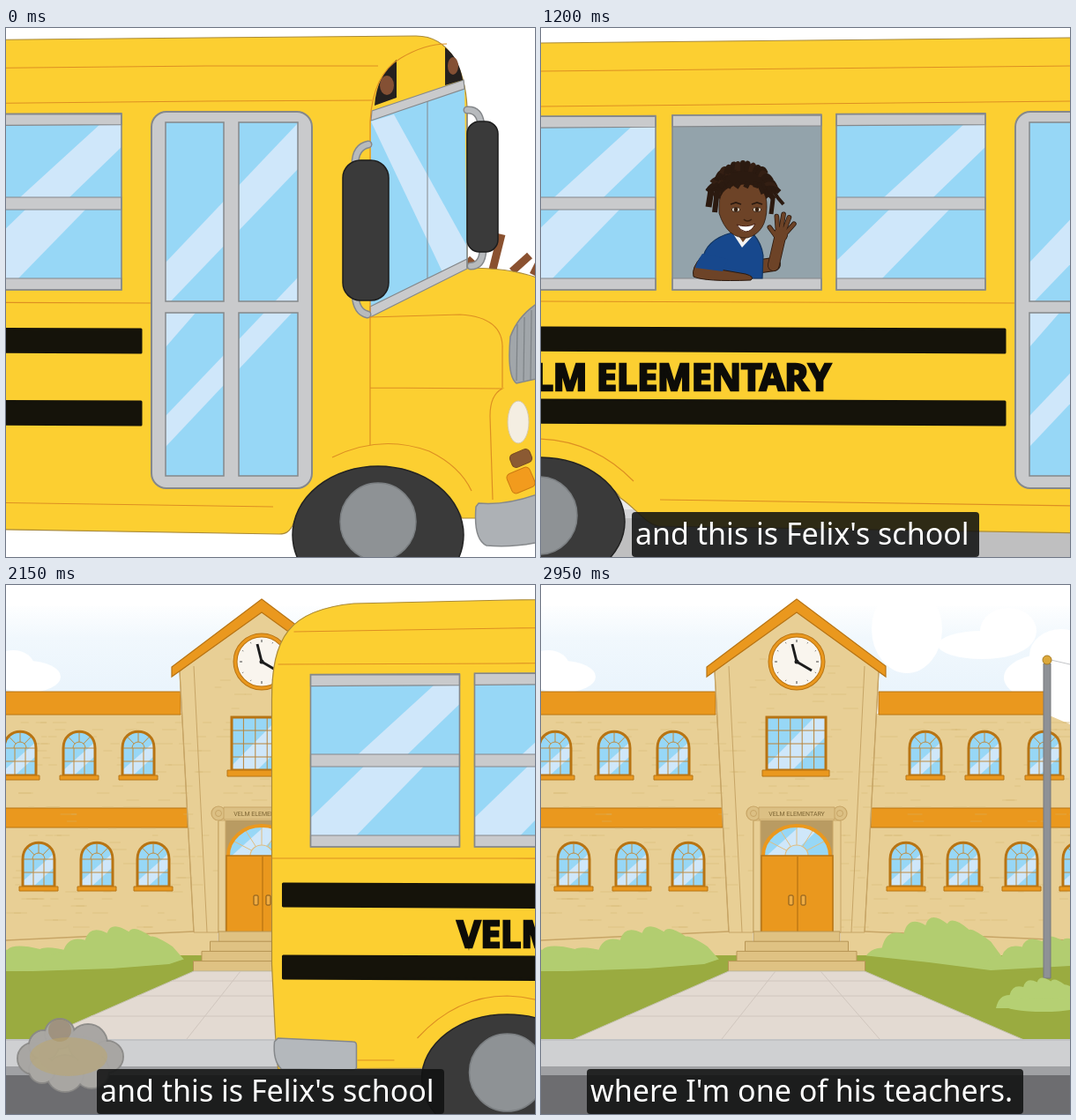
An HTML page with a canvas that plays this animation: 600x600 px, repeating every 3 s.

```html
<!DOCTYPE html>
<html lang="en">
<head>
<meta charset="utf-8">
<title>School bus</title>
<style>
html, body { margin: 0; width: 100%; height: 100%; overflow: hidden; background: #fff; }
canvas { display: block; width: 600px; height: 600px; }
</style>
</head>
<body>
<canvas id="stage" width="600" height="600"></canvas>
<script>
const LOOP = 3000, STEP = 50;
const YELLOW = '#fccf31', LINE = '#dd8f22', EDGE = '#85888b', BAR = '#c9cacc';
const GLASS = '#97d7f6', GLARE = '#cfe7fa', ORANGE = '#ea981e', RUST = '#b87413';
const WALL = '#e8cf95', STONE = '#c7a566', DARK = '#3a3a3a', SKIN = '#6d4327';
const stage = document.getElementById('stage').getContext('2d');
let c = stage;

function paint(fill, stroke, width = 1.5) {
  if (fill) { c.fillStyle = fill; c.fill(); }
  if (stroke) { c.strokeStyle = stroke; c.lineWidth = width; c.stroke(); }
}
function poly(pts, fill, stroke, width) {
  c.beginPath();
  for (let i = 0; i < pts.length; i += 2) c.lineTo(pts[i], pts[i + 1]);
  c.closePath();
  paint(fill, stroke, width);
}
function line(pts, color, width = 1) {
  c.beginPath();
  for (let i = 0; i < pts.length; i += 2) c.lineTo(pts[i], pts[i + 1]);
  paint(null, color, width);
}
function box(x, y, x2, y2, fill, stroke, width, r = 0) {
  c.beginPath();
  c.roundRect(x, y, x2 - x, y2 - y, r);
  paint(fill, stroke, width);
}
function oval(x, y, rx, ry, fill, stroke, width) {
  c.beginPath();
  c.ellipse(x, y, rx, ry, 0, 0, Math.PI * 2);
  paint(fill, stroke, width);
}
function shape(d, fill, stroke, width = 1.5) {
  const p = new Path2D(d);
  if (fill) { c.fillStyle = fill; c.fill(p); }
  if (stroke) { c.strokeStyle = stroke; c.lineWidth = width; c.stroke(p); }
}
function clipped(path, draw) {
  c.save();
  c.beginPath();
  path();
  c.clip();
  draw();
  c.restore();
}
function at(x, y, draw) {
  c.save();
  c.translate(x, y);
  draw();
  c.restore();
}
function random(seed) {
  return () => (seed = (seed * 16807) % 2147483647) / 2147483647;
}

// ---------- school ----------
function bricks() {
  const rnd = random(41);
  c.globalAlpha = 0.45;
  for (let i = 0; i < 420; i++) {
    const x = rnd() * 600, y = 60 + Math.floor(rnd() * 42) * 8, w = 6 + rnd() * 14;
    if (y < 150 && (x < 205 || x > 360)) continue;
    if (y < 112 && Math.abs(x + w / 2 - 290) > y - 42) continue;
    line([x, y, x + w, y], '#d3b36d');
  }
  c.globalAlpha = 1;
}
function archWindow(x, y) {
  const bars = '#c08a3c';
  const outline = () => {
    c.moveTo(x - 18, y + 50);
    c.lineTo(x - 18, y + 19);
    c.bezierCurveTo(x - 18, y - 6, x + 18, y - 6, x + 18, y + 19);
    c.lineTo(x + 18, y + 50);
    c.closePath();
  };
  clipped(outline, () => {
    box(x - 20, y - 2, x + 20, y + 52, GLASS);
    poly([x - 18, y + 44, x + 18, y + 12, x + 18, y + 28, x - 6, y + 50, x - 18, y + 50], GLARE);
    for (const k of [-6, 6]) line([x + k, y + 19, x + k, y + 50], bars);
    for (const k of [19, 34]) line([x - 18, y + k, x + 18, y + k], bars);
    for (const a of [0.8, 1.57, 2.34])
      line([x + 7 * Math.cos(a), y + 19 - 7 * Math.sin(a), x + 22 * Math.cos(a), y + 19 - 22 * Math.sin(a)], bars);
    c.beginPath();
    c.arc(x, y + 19, 7, Math.PI, Math.PI * 2);
    paint(null, bars, 1);
  });
  c.beginPath();
  outline();
  paint(null, RUST, 3);
  box(x - 22, y + 50, x + 22, y + 55, ORANGE, RUST, 1);
}
function bush(x, x2, base, top, color) {
  const w = x2 - x, h = base - top;
  c.beginPath();
  c.moveTo(x, base);
  for (let i = 0; i < 7; i++) {
    const hill = Math.sin(Math.PI * (i + 1) / 8);
    c.quadraticCurveTo(x + w * (i + 0.2) / 7, base - h * hill * 1.15,
      x + w * (i + 1) / 7, base - (i < 6 ? h * 0.9 * Math.sin(Math.PI * (i + 1.3) / 8) : 0));
  }
  c.closePath();
  paint(color);
}
function sky() {
  box(0, 0, 600, 600, '#fff');
  const g = c.createLinearGradient(0, 20, 0, 120);
  g.addColorStop(0, '#fff');
  g.addColorStop(0.4, '#f1f8fd');
  g.addColorStop(1, '#eaf4fc');
  box(0, 24, 600, 125, g);
  for (const [x, y, rx, ry] of [[24, 104, 38, 18], [8, 92, 24, 18], [500, 68, 50, 16], [530, 52, 32, 26],
    [580, 105, 55, 28], [415, 50, 40, 50], [590, 80, 36, 30]])
    oval(x, y, rx, ry, '#fff');
}
function tower() {
  poly([197, 98, 290, 26, 383, 98, 367, 394, 213, 394], WALL, STONE, 1);
  bricks();
  for (const s of [-1, 1]) {
    line([290 + s * 77, 92, 290 + s * 62, 394], STONE);
    line([290 + s * 93, 98, 290 + s * 77, 394], STONE, 1.3);
    line([290 + s * 49, 268, 290 + s * 49, 394], STONE, 1.3);
  }
  poly([188, 93, 290, 16, 391, 92, 391, 104, 290, 31, 188, 104], ORANGE, RUST, 1.2);
  oval(290, 87, 30, 30, '#f9f5ee', RUST, 5);
  oval(290, 87, 30, 30, null, ORANGE, 3);
  for (let i = 0; i < 12; i++) {
    const a = i * Math.PI / 6, r = i % 3 ? 24 : 22;
    line([290 + r * Math.cos(a), 87 + r * Math.sin(a), 290 + 25 * Math.cos(a), 87 + 25 * Math.sin(a)], '#444');
  }
  line([290, 87, 285, 67], '#1c1c1c', 3);
  line([290, 87, 307, 97], '#1c1c1c', 3);
  oval(290, 87, 2.5, 2.5, '#1c1c1c');

  box(256, 150, 323, 210, GLASS);
  clipped(() => c.rect(256, 150, 67, 60), () =>
    poly([256, 205, 310, 150, 323, 150, 323, 172, 285, 210, 256, 210], GLARE));
  for (let i = 1; i < 5; i++) line([256 + i * 13.4, 150, 256 + i * 13.4, 210], '#b98337');
  for (let i = 1; i < 4; i++) line([256, 150 + i * 15, 323, 150 + i * 15], '#b98337');
  box(256, 150, 323, 210, null, RUST, 3);
  box(251, 210, 327, 217, ORANGE, RUST, 1);
}
function entrance() {
  box(248, 267, 332, 394, '#b99b62');
  box(241, 267, 249, 394, WALL, STONE, 1);
  box(331, 267, 340, 394, WALL, STONE, 1);
  for (const x of [241, 339]) {
    oval(x, 259, 8, 8, '#dcc084', STONE, 1.2);
    oval(x, 259, 3.5, 3.5, null, STONE, 1);
  }
  box(247, 252, 333, 266, '#dcc084', STONE, 1);
  c.fillStyle = '#7c6433';
  c.font = '7px Roboto, sans-serif';
  c.textAlign = 'center';
  c.fillText('VELM ELEMENTARY', 290, 262);
  const arch = () => c.ellipse(290, 307, 38, 34, 0, Math.PI, Math.PI * 2);
  clipped(arch, () => {
    box(250, 270, 332, 308, GLASS);
    poly([255, 308, 295, 272, 320, 272, 282, 308], GLARE);
    for (let i = 1; i < 6; i++) {
      const a = i * Math.PI / 6;
      line([290, 307, 290 + 40 * Math.cos(a), 307 - 36 * Math.sin(a)], '#e0bd80');
    }
    oval(290, 307, 13, 12, '#bfe3f8', '#e0bd80', 1.2);
  });
  c.beginPath();
  arch();
  paint(null, ORANGE, 4);
  box(250, 307, 331, 394, ORANGE, RUST, 1.5);
  line([291, 308, 291, 393], RUST, 1.3);
  box(281, 352, 286, 363, '#f0ac42', '#7d551a', 1, 1);
  box(295, 352, 300, 363, '#f0ac42', '#7d551a', 1, 1);
  for (let i = 0; i < 4; i++) {
    const half = 49 + i * 9.5;
    box(290 - half, 393 + i * 11.2, 290 + half, 404.5 + i * 11.2, '#dfc283', '#b79554', 1);
  }
}
function school() {
  sky();
  box(0, 146, 240, 430, WALL);
  poly([340, 146, 572, 146, 600, 158, 600, 430, 340, 430], WALL);
  for (const [y, y2, l, r, end] of [[121, 147, 198, 383, 571], [253, 275, 206, 374, 602]]) {
    box(-2, y, l, y2, ORANGE, RUST, 1);
    box(r, y, end, y2, ORANGE, RUST, 1);
  }
  tower();
  for (const x of [16, 83, 150, 436, 503, 571]) archWindow(x, 166);
  for (const x of [37, 103, 167, 414, 479, 545, 610]) archWindow(x, 292);
  line([0, 403, 213, 393], STONE, 1.3);
  line([367, 393, 600, 403], STONE, 1.3);
  box(0, 420, 600, 516, '#9aab40');
  bush(-110, 150, 438, 410, '#b2cd70');
  bush(40, 214, 438, 388, '#b2cd70');
  bush(362, 535, 438, 378, '#b2cd70');
  bush(500, 660, 438, 399, '#b2cd70');
  poly([0, 439, 120, 435, 185, 430, 215, 420, 215, 450, 0, 450], '#9aab40');
  poly([365, 420, 440, 428, 510, 437, 600, 432, 600, 450, 365, 450], '#9aab40');
  entrance();
  poly([213, 438, 367, 438, 548, 516, 35, 516], '#e3dad2', '#c4c2ad', 1);
  for (const y of [449, 466, 489]) {
    const k = (y - 438) / 78;
    line([213 - 178 * k, y, 367 + 181 * k, y], '#d0c6be');
  }
  line([266, 438, 205, 515], '#d0c6be');
  line([317, 438, 384, 515], '#d0c6be');
  box(0, 515, 600, 546, '#cfd0d2');
  box(0, 546, 600, 556, '#a0a1a4');
  box(0, 556, 600, 600, '#6d6d70');
  line([0, 516, 600, 516], '#b5b6b8');
  line([574, 84, 600, 90], '#c3c5c8');
  box(570, 89, 578, 446, '#8e9196', '#77797d', 1);
  oval(574, 85, 5, 5, '#dca83a', '#a97d23', 1);
  bush(516, 625, 480, 446, '#b5d073');
  oval(570, 476, 46, 8, '#b5d073');
}

// ---------- bus ----------
function busWindow(x, open) {
  const r = x + 169, top = 100 - x * 0.007;
  box(x, top, r, 297, open ? '#93a3ab' : GLASS);
  if (!open) {
    poly([x + 54, 192, x + 146, 108, r, 108, r, 135, x + 110, 192], GLARE);
    poly([x, 264, x + 60, 206, x + 128, 206, x + 52, 284, x, 284], GLARE);
    box(x, 192, r, 206, BAR, EDGE, 1.2);
  }
  poly([x, top, r, top - 1, r, top + 12, x, top + 13], BAR, EDGE, 1.2);
  box(x, 284, r, 297, BAR, EDGE, 1.2);
  box(x, top, r, 297, null, EDGE, 1.6);
}
function door() {
  at(373, 0, () => {
    box(165, 95, 347, 522, BAR, EDGE, 2, 17);
    const panes = [[181, 107, 247, 310], [264, 107, 331, 310], [181, 323, 247, 508], [264, 323, 331, 508]];
    for (const [x, y, x2, y2] of panes) {
      clipped(() => c.rect(x, y, x2 - x, y2 - y), () => {
        box(x, y, x2, y2, GLASS);
        poly([181, 266, 331, 108, 331, 160, 181, 316], GLARE);
        poly([181, 440, 331, 283, 331, 316, 181, 475], GLARE);
        poly([181, 323, 215, 323, 181, 362], GLARE);
      });
      box(x, y, x2, y2, null, EDGE, 1.5);
    }
  });
}
function wheel(x, y, ry, hubY) {
  oval(x, y, 97, ry, DARK, '#222', 1.5);
  oval(x, hubY, 43, 44, '#8e9295', '#7b7f82', 1.5);
}
function front() {
  shape('M414 102 L520 66 L523 268 L413 324 Z', GLASS);
  poly([414, 106, 440, 98, 522, 246, 522, 268, 497, 281], GLARE);
  line([478, 82, 478, 286], EDGE);
  poly([415, 94, 519, 59, 520, 69, 414, 105], BAR, EDGE, 1.2);
  poly([413, 316, 523, 262, 523, 273, 413, 328], BAR, EDGE, 1.2);
  shape('M418 88 Q420 55 443 36 L443 79 Z', '#25211f');
  oval(432, 65, 8, 11, '#845034');
  shape('M498 22 Q514 34 518 59 L498 65 Z', '#25211f');
  oval(507, 43, 6, 10, '#845034');
  shape('M413 328 L413 106 Q416 52 448 34 Q475 18 500 18', null, LINE, 1.2);
  line([523, 90, 523, 272], EDGE, 1.5);

  c.lineCap = 'round';
  for (const [color, w] of [[EDGE, 9], ['#b7babd', 6]]) {
    shape('M411 132 Q396 135 396 155 M396 302 Q397 322 410 325', null, color, w);
    shape('M523 93 Q537 92 539 110 M541 252 Q540 270 527 270', null, color, w);
  }
  c.lineCap = 'butt';
  box(523, 106, 558, 254, DARK, '#1d1d1d', 1.5, 14);
  box(382, 150, 434, 309, DARK, '#1d1d1d', 1.5, 20);

  shape('M413 473 L413 328 L515 325 Q565 328 563 365 L563 408 M413 408 L563 409 Q549 416 549 440 L552 535', null, LINE, 1.2);
  shape('M370 487 Q425 460 480 480 Q515 497 528 525', null, LINE, 1.2);
  shape('M572 350 Q580 328 600 314 L610 314 L610 396 L579 403 Q568 395 572 350 Z', '#a1a6aa', EDGE);
  for (const x of [580, 588, 596]) line([x, 336 - (x - 580), x - 1, 400], '#7d8286', 1.2);
  oval(581, 447, 12, 24, '#f4eee2', '#d6c9a8', 1);
  at(584, 488, () => { c.rotate(-0.4); box(-12, -8, 12, 8, '#8b5a33', '#75481f', 1, 5); });
  at(584, 513, () => { c.rotate(-0.4); box(-14, -12, 14, 12, '#f29b1d', '#cc7b12', 1, 5); });
  shape('M536 539 Q570 542 610 526 L610 582 Q575 590 545 587 Q530 580 533 543 Z', '#adb1b5', EDGE);
}
function lettering() {
  const family = '"Liberation Sans Narrow", "Open Sans", "Liberation Sans", sans-serif';
  c.fontStretch = 'condensed';
  c.textAlign = 'left';
  c.font = `bold 48px ${family}`;
  const size = Math.min(50, 48 * 266 / c.measureText('ELEMENTARY').width);
  c.font = `bold ${size}px ${family}`;
  c.fillStyle = c.strokeStyle = '#0d0c08';
  c.lineWidth = 2.5;
  for (const [word, x] of [['VELM', -59], ['ELEMENTARY', 63]]) {
    c.fillText(word, x, 411);
    c.strokeText(word, x, 411);
  }
  c.fontStretch = 'normal';
}
function boy(t) {
  const ink = '#2b1a10';
  // waving arm, turning on the elbow
  const turn = 21 + 8 * Math.cos((t - 350) / 567 * Math.PI * 2);
  at(263, 268, () => {
    c.lineCap = c.lineJoin = 'round';
    line([-13, 2, 1, 0], ink, 16);
    line([-13, 2, 1, 0], SKIN, 14);
    c.rotate(turn * Math.PI / 180);
    for (const [color, extra] of [[ink, 1.6], [SKIN, 0]]) {
      line([1, 1, 1, -30], color, 12 + extra);
      oval(1, -35, 7.5 + extra / 2, 8.5 + extra / 2, color);
      for (const [x, y, x2, y2] of [[-5, -33, -13, -40], [-4, -41, -8, -54], [0, -42, -1, -58], [4, -41, 6, -56], [7, -39, 13, -50]])
        line([x, y, x2, y2], color, 4 + extra);
    }
  });
  shape('M183 264 Q186 240 217 232 L241 234 Q250 244 252 258 L251 284 L195 284 Z', '#17488d', '#123560', 1.2);
  shape('M183 258 Q170 272 173 282 Q186 288 238 286 Q243 282 232 279 L203 274 Z', SKIN, ink, 1);
  shape('M183 256 Q176 266 175 272 L206 276 L212 262 Z', '#17488d');
  shape('M217 232 L228 249 L240 236 L238 230 Z', '#f3f3f3');
  shape('M219 228 L229 243 L239 230 Z', SKIN);
  // hair behind and around the face
  oval(229, 179, 34, 24, ink);
  const rnd = random(9);
  for (let i = 0; i < 21; i++) {
    const a = Math.PI * (0.94 + 1.12 * i / 20), r = 34 + rnd() * 8;
    const x = 229 + 26 * Math.cos(a), y = 182 + 20 * Math.sin(a);
    c.beginPath();
    c.moveTo(x, y);
    c.quadraticCurveTo(229 + (r - 6) * Math.cos(a), 180 + 34 * Math.sin(a), 229 + r * Math.cos(a), 184 + 27 * Math.sin(a) + rnd() * 6);
    paint(null, i % 3 ? ink : '#341f13', 6);
  }
  line([193, 184, 190, 203], ink, 7);
  line([200, 184, 197, 209], ink, 6);
  line([258, 180, 263, 194, 261, 211], ink, 5);
  line([263, 184, 269, 193, 275, 200], ink, 4);
  shape('M202 201 Q202 177 232 177 Q257 178 256 203 Q256 232 234 238 Q211 239 202 210 Z', SKIN, ink, 0.8);
  for (const x of [207, 216, 225, 235, 245]) line([x, 175, x - 4 + (x % 3), 181], ink, 6);
  line([247, 176, 252, 188], ink, 5);
  for (const x of [221, 245]) {
    line([x - 6, 200, x, 198, x + 6, 200], ink, 1.8);
    oval(x, 206, 4.6, 2.4, '#e6dccd', ink, 0.8);
    oval(x, 206, 2.3, 2.4, '#3a2110');
  }
  shape('M230 217 Q234 221 239 217', null, '#3d2413', 1.5);
  shape('M222 223 Q233 227 243 222 Q239 231 232 231 Q226 230 222 223 Z', '#fff', '#4b2215', 1);
  c.lineCap = 'butt';
  c.lineJoin = 'miter';
}
function bus(t) {
  shape('M-265 510 L-269 430 L-269 130 C-269 60 -250 28 -176 21 L0 17 L600 11 L838 9 C878 9 894 50 896 90 L896 272 ' +
    'C930 272 960 277 980 285 L980 556 L890 556 C870 500 730 500 700 560 C695 572 690 574 683 574 ' +
    'L133 565 C118 562 108 545 90 533 C65 492 -64 492 -98 548 L-262 549 Z', YELLOW, '#a98a3a', 1.2);
  line([-244, 53, 0, 49, 600, 43, 795, 43], LINE, 1.2);
  line([-262, 90, 0, 89, 600, 83, 788, 82], LINE, 1.2);
  line([-269, 310, 0, 310, 538, 312], LINE, 1.2);
  line([135, 535, 676, 543], LINE, 1.2);
  line([-172, 539, -130, 539], LINE, 1.2);
  shape('M-104 514 Q-60 466 -2 466 Q60 468 105 514', null, LINE, 1.2);
  c.lineJoin = 'round';
  for (const y of [338, 420])
    poly([-256, y + 1, 526, y + 4, 526, y + 30, -256, y + 26], '#15130a', '#15130a', 3);
  c.lineJoin = 'miter';
  lettering();
  for (const x of [-225, -39, 335]) busWindow(x);
  busWindow(149, true);
  boy(t);
  door();
  at(373, 0, front);
  wheel(-2, 560, 73, 553);
  wheel(795, 575, 78, 560);
  shape('M-262 514 L-177 518 Q-173 518 -173 522 L-173 547 Q-173 550 -178 550 L-258 549 Q-268 540 -266 518 Z', '#b4b8bc', EDGE);
}

// ---------- motion ----------
function busX(t) {
  if (t < 340) return -373 * (1 - t / 340) ** 2;
  return t < 1569 ? 0 : 0.00169 * (t - 1569) ** 2;
}
function branches() {
  for (const p of [[551, 278, 562, 234], [574, 276, 594, 258], [598, 280, 604, 268], [523, 262, 534, 272]])
    line(p, '#8a5130', 9);
}
function puff(t) {
  if (t < 1950 || t > 2450) return;
  const size = Math.min(1, 0.4 + (t - 1950) / 320);
  c.globalAlpha = 0.92 * Math.min(1, (2450 - t) / 250);
  at(73, 533, () => {
    c.scale(size, size);
    const lumps = [[-42, 4, 18], [-30, -11, 17], [-12, -24, 17], [20, -13, 22], [42, 2, 18], [24, 18, 20], [-6, 21, 21], [-32, 17, 15]];
    for (const [x, y, r] of lumps) oval(x, y, r, r, '#a9a7a3', '#8a8987', 2);
    for (const [x, y, r] of lumps) oval(x, y, r - 1, r - 1, '#a9a7a3');
    oval(0, 0, 36, 24, '#a9a7a3');
    oval(-12, -28, 13, 13, 'rgba(150,126,92,.55)');
    oval(-2, 2, 44, 22, 'rgba(190,166,100,.5)');
  });
  c.globalAlpha = 1;
}
function caption(t) {
  if (t < 150) return;
  const [text, x, x2] = t < 1100 ? ['This is Felix', 205, 394]
    : t < 2300 ? ["and this is Felix's school", 103, 497]
    : ["where I'm one of his teachers.", 52, 547];
  box(x, 549, x2, 600, 'rgba(17,18,18,.87)', null, 0, 4);
  c.font = '34px "Noto Sans", "Open Sans", sans-serif';
  c.textAlign = 'left';
  c.fillStyle = '#fff';
  c.fillText(text, x + 4, 586);
}

const backdrop = document.createElement('canvas');
backdrop.width = backdrop.height = 600;
c = backdrop.getContext('2d');
school();
c = stage;

function draw(now) {
  const t = Math.floor((now % LOOP) / STEP) * STEP;
  box(0, 0, 600, 600, '#fff');
  if (t < 1100) branches();
  c.globalAlpha = Math.max(0, Math.min(1, (t - 1100) / 230));
  c.drawImage(backdrop, 0, 0);
  c.globalAlpha = 1;
  puff(t);
  const x = busX(t);
  if (x < 880) at(x, 0, () => bus(t));
  caption(t);
}
function tick() {
  draw(performance.now());
  requestAnimationFrame(tick);
}
tick();
</script>
</body>
</html>
```
